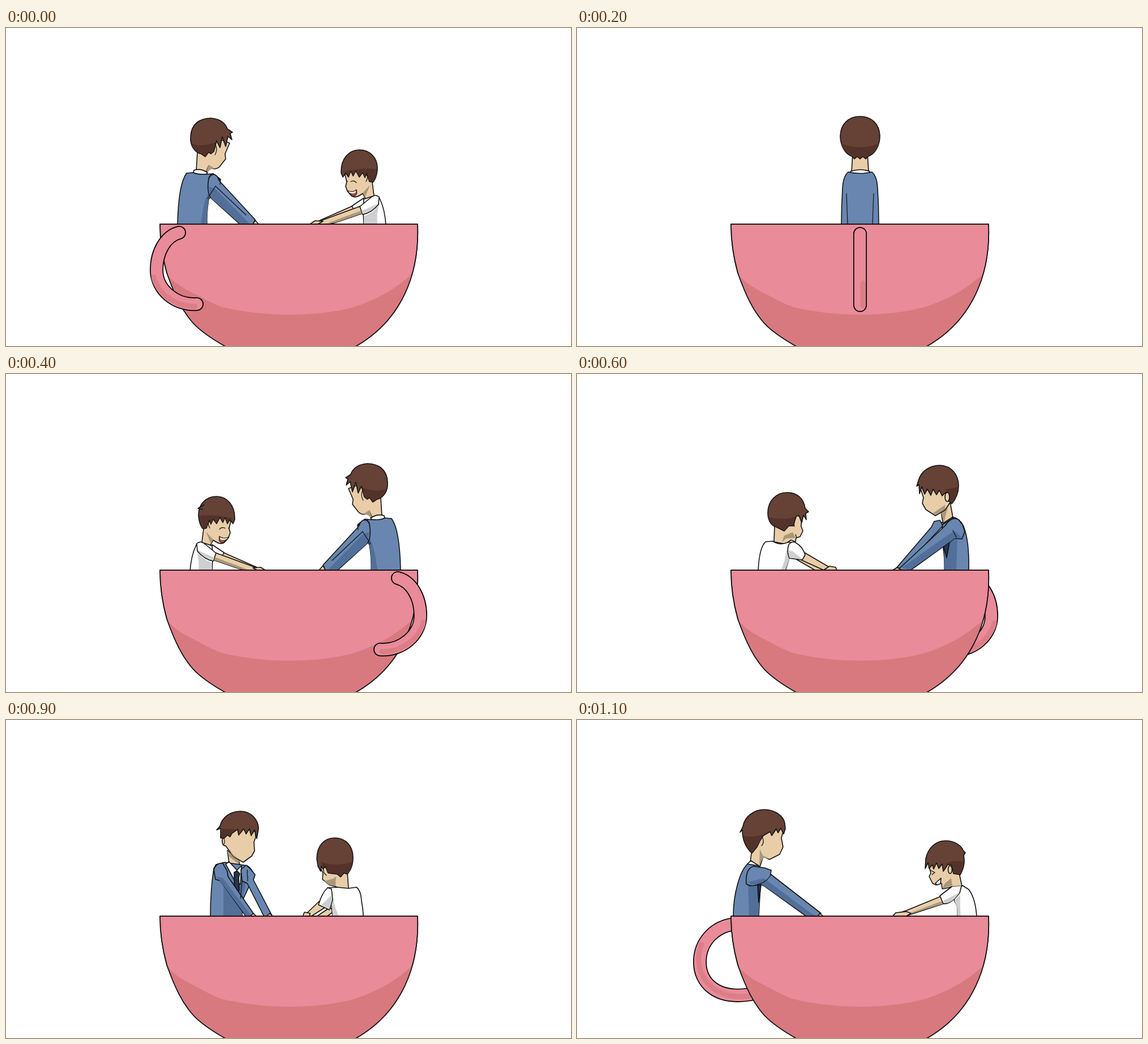
Recreate the animation shown at these times as an HTML page without scripts. Size 998x561 px, loop 1.2 s.

```html
<!DOCTYPE html>
<html lang="en">
<head>
<meta charset="utf-8">
<title>Teacup ride</title>
<style>
html, body { margin: 0; width: 100%; height: 100%; overflow: hidden; background: #fff; }
svg { display: block; width: 100%; height: 100%; stroke: #111; stroke-width: 1.6px; stroke-linejoin: round; stroke-linecap: round; }
.hair { fill: #654136; }
.skin { fill: #e8cda8; }
.blue { fill: #6886b0; }
.tie { fill: #263550; }
.white { fill: #fff; }
.line { fill: none; stroke-width: 1.2px; }
.mouth { fill: #a5493f; stroke-width: 1px; }
.shade { stroke: none; }
.shade.hair { fill: #53322a; }
.shade.skin { fill: #ab9779; }
.shade.blue { fill: #526f99; }
.shade.white { fill: #cfcfd1; }
.cup { fill: #e98b99; }
.dark { fill: #d8797f; stroke: none; }
.tube { fill: none; }
.edge { stroke: #000; stroke-width: 24px; }
.pink { stroke: #e98b99; stroke-width: 20.6px; }
.low { stroke: #dc7e88; stroke-width: 9px; }
.turn > g { visibility: hidden; animation: show 1.2s step-end infinite; animation-delay: calc((var(--i) - 12) * 100ms); }
@keyframes show {
  0% { visibility: visible; }
  8.3333%, 100% { visibility: hidden; }
}
</style>
</head>
<body>
<svg viewBox="0 0 998 561">
<defs>
  <path id="cup" d="M272 346H727C731 433 699 516 617 562H388C372 553 345 536 331 521C312 500 299 474 284 432C275 400 272 375 272 346Z"/>
  <clipPath id="inCup"><use href="#cup"/></clipPath>

  <!-- handle: three-quarter, near front, centre, side -->
  <path id="t1" d="M306 361C282 367 266 395 266 427C266 462 300 490 337 487"/>
  <path id="t2" d="M386 364C365 366 352 392 352 418C352 455 371 496 402 489"/>
  <path id="t3" d="M500 363V489"/>
  <path id="t4" d="M282 360C243 362 217 392 217 427C217 462 245 494 306 484"/>
  <g id="h1" class="tube">
    <use href="#t1" class="edge"/><use href="#t1" class="pink"/>
    <path class="low" d="M261 439C264 462 296 492 334 491"/>
  </g>
  <g id="h2" class="tube">
    <path class="low" d="M365 410C367 393 377 383 392 376M409 490L415 497"/>
    <use href="#t2" class="edge"/><use href="#t2" class="pink"/>
    <path class="low" d="M357 444C360 470 378 492 400 492"/>
  </g>
  <g id="h3" class="tube">
    <use href="#t3" class="edge"/><use href="#t3" class="pink"/>
    <path class="low" d="M505 450V490"/>
  </g>
  <g id="h4" class="tube">
    <use href="#t4" class="edge"/><use href="#t4" class="pink"/>
    <path class="low" d="M220 396C202 440 232 496 304 487"/>
  </g>

  <!-- man, from behind to front -->
  <g id="man1">
    <path class="skin" d="M338 220L336 252L353 255L358 243C364 250 371 250 377 245L388 231L387 222L395 203L370 193Z"/>
    <path class="shade skin" d="M354 253L358 241L369 248Q360 248 356 255Z"/>
    <path class="white" d="M332 251Q343 247 356 255L352 260H330Z"/>
    <path class="blue" d="M319 256C310 268 304 300 303 347H355C354 330 356 315 358 302L372 285L379 267L366 257Q340 260 331 255Z"/>
    <path class="shade blue" d="M344 346C348 320 350 302 359 289L358 302C356 320 355 330 355 346Z"/>
    <path class="blue" d="M358 266C362 255 372 256 376 268L379 272L440 338L436 347H414L362 300C356 292 356 278 358 266Z"/>
    <path class="shade blue" d="M358 280L369 283L431 346H414L362 300Z"/>
    <path class="line" d="M358 264L362 258M356 301L370 279L424 330M374 263L379 269L378 276"/>
    <path class="skin" d="M436 347L440 339L447 347Z"/>
    <path class="hair" d="M326 192C327 168 344 159 362 159C378 160 388 168 391 178L400 184L396 186L399 197L392 191L388 209L382 192L378 211L372 199L367 218L362 222L358 219L352 227L345 222C333 220 325 207 326 192Z"/>
    <path class="shade hair" d="M329 204C340 209 356 207 369 202L366 218L362 221L358 218L352 226L345 221C336 219 332 212 329 204Z"/>
    <path class="line" d="M369 204Q375 214 369 224"/>
  </g>
  <g id="man2">
    <path class="skin" d="M394 226L393 251L412 255L415 246L426 249Q435 242 439 228L442 203L420 205Z"/>
    <path class="shade skin" d="M411 254L415 239L427 248L417 247Z"/>
    <path class="white" d="M390 252Q402 247 412 257L396 260Z"/>
    <path class="blue" d="M421 305L441 347H418Z"/>
    <path class="blue" d="M373 253Q366 262 365 283Q362 315 361 347H420Q420 305 426 290L436 262L430 256L413 257L390 254Z"/>
    <path class="blue" d="M421 264Q429 252 436 262L442 272L438 287L475 347H458L430 296L422 296Q420 278 421 264Z"/>
    <path class="shade blue" d="M422 283L436 286L431 296H423Z"/>
    <path class="hair" d="M376 190C377 170 392 158 411 158C431 158 440 172 442 185L448 193L443 194L444 211L440 206L437 209L433 206L427 222L421 232L414 227L411 231L396 227C382 222 375 206 376 190Z"/>
    <path class="shade hair" d="M378 207C393 215 415 213 432 206L427 221L421 231L414 226L411 230L396 226C387 222 380 214 378 207Z"/>
    <path class="line" d="M433 207Q438 216 431 223M440 193L438 200"/>
  </g>
  <g id="manBack">
    <path class="skin" d="M487 220L485 254H515L513 220Z"/>
    <path class="white" d="M483 253Q500 247 517 253L515 259H485Z"/>
    <path class="blue" d="M479 254Q470 262 469 283Q467 315 467 347H533Q533 315 531 283Q530 262 521 254Q500 259 479 254Z"/>
    <path class="line" d="M476 292L478 346M524 292L522 346"/>
    <path class="hair" d="M465 190C466 169 480 156 500 156C520 156 534 169 535 190C535 207 527 222 515 226L510 231L505 227L500 231L495 227L490 231L485 226C473 222 465 207 465 190Z"/>
    <path class="shade hair" d="M467 204Q500 217 533 204C530 215 523 223 515 225L510 230L505 226L500 230L495 226L490 230L485 225C476 221 469 214 467 204Z"/>
  </g>
  <g id="man3">
    <path class="skin" d="M643 244L647 266L664 253L659 226Z"/>
    <path class="shade skin" d="M643 245L655 235L648 262Z"/>
    <path class="white" d="M640 260L647 263L664 252L666 257L648 268Z"/>
    <path class="blue" d="M645 266L666 253Q680 257 685 275Q693 300 692 347H649Q650 320 645 296Z"/>
    <path class="shade blue" d="M648 300L672 290L670 346H649Z"/>
    <path class="tie" d="M646 300L660 286L653 324Z"/>
    <path class="blue" d="M626 270L631 260L641 258L646 268L580 338L560 347Z"/>
    <path class="blue" d="M650 268Q662 250 674 257L681 266L685 278L680 291L667 290L588 347H564L575 338Z"/>
    <path class="shade blue" d="M574 342L655 284L667 277L681 289L667 290L588 346Z"/>
    <path class="line" d="M664 276L670 288"/>
    <path class="skin" d="M556 347L566 341L574 347Z"/>
    <path class="skin" d="M606 200L612 218L610 228L616 239L633 250L650 240L661 224L655 198Z"/>
    <path class="shade skin" d="M628 246L650 231L650 239L633 249Z"/>
    <path class="hair" d="M600 198L603 188C608 170 625 161 641 161C662 162 674 178 674 197C674 212 668 222 662 229L656 224L651 209L645 215L640 205L635 213L629 203L625 214L619 203L614 212L609 199L605 211L604 195Z"/>
    <path class="shade hair" d="M651 203Q664 202 673 199C673 212 668 221 662 228L656 223Z"/>
    <ellipse class="skin" cx="654" cy="217" rx="4" ry="8"/>
  </g>
  <g id="man4">
    <path class="skin" d="M391 230L394 252L408 268L414 262L411 246Z"/>
    <path class="shade skin" d="M391 231L412 247L411 254L393 240Z"/>
    <path class="blue" d="M371 255L386 251L426 257Q435 262 438 275L418 318L417 347H361Q361 300 367 262Z"/>
    <path class="shade blue" d="M384 346V290L425 280L418 318L417 346Z"/>
    <path class="white" d="M394 250L388 254L404 284L414 290L416 257L408 265Z"/>
    <path class="tie" d="M403 269L408 266L413 271L411 278L412 300L405 320L403 280Z"/>
    <path class="blue" d="M415 264L424 256L432 263L440 273L437 282L471 347H456L426 288L417 284Z"/>
    <path class="blue" d="M367 264Q372 251 383 253L391 267L392 276L441 347H424L379 284L370 281Z"/>
    <path class="shade blue" d="M370 276L383 279L434 346H424L379 285Z"/>
    <path class="line" d="M417 285L414 315M426 264L427 284"/>
    <path class="skin" d="M430 347L437 341L443 347ZM459 347L466 341L472 347Z"/>
    <path class="skin" d="M384 198L382 211Q381 222 388 222L402 241L419 251L434 240L439 231L438 215L441 207L440 185Z"/>
    <path class="shade skin" d="M388 222Q398 238 419 250L402 241Z"/>
    <path class="hair" d="M372 194L378 187C382 170 398 161 414 161C432 161 446 175 446 192L443 209L439 194L433 204L430 192L424 201L420 192L411 203L409 193L399 200L396 206L391 203L385 209L379 208V191Z"/>
    <path class="shade hair" d="M379 192L409 193L399 199L396 205L391 202L385 208L380 207Z"/>
    <path class="line" d="M384 208Q388 213 385 219"/>
  </g>
  <g id="man5">
    <path class="skin" d="M309 228L306 251L323 259L329 241L340 246L358 237L364 224L361 208L366 190L326 200Z"/>
    <path class="shade skin" d="M322 257L323 228L329 240L340 245L329 243Z"/>
    <path class="white" d="M301 254L307 248L321 257L312 262Z"/>
    <path class="blue" d="M301 254Q290 265 283 292Q276 318 276 347H321L324 292L341 275L320 257Z"/>
    <path class="shade blue" d="M304 346L302 285L324 290L321 346Z"/>
    <path class="tie" d="M319 291L325 292L321 322Z"/>
    <path class="blue" d="M299 289Q297 262 312 258L332 261L343 265L342 272L431 341L426 347H406L331 293L322 289Q308 296 299 289Z"/>
    <path class="shade blue" d="M302 286L330 279L412 340L424 346H406L331 293L322 288Q310 294 302 286Z"/>
    <path class="line" d="M323 289Q336 285 343 272"/>
    <path class="skin" d="M425 347L429 341L436 347Z"/>
    <path class="hair" d="M288 198L293 188C296 170 313 158 331 158C350 158 365 170 367 182L368 192L365 201L360 191L355 199L352 192L344 204L341 197L329 204L324 212L318 224L309 235C299 226 292 212 292 194Z"/>
    <path class="shade hair" d="M293 204Q312 209 329 201L324 212L318 223L309 234Q297 222 293 204Z"/>
    <path class="line" d="M327 206Q332 215 326 222"/>
  </g>
  <g id="manFront">
    <path class="blue" d="M466 262Q472 252 487 252H513Q528 252 534 262L540 300L532 347H468L460 300Z"/>
    <path class="white" d="M488 250L500 290L512 250Z"/>
    <path class="tie" d="M497 266H503L505 310L500 320L495 310Z"/>
    <path class="skin" d="M469 195L473 225L486 241L500 250L514 241L527 225L531 195Z"/>
    <path class="hair" d="M464 200C463 174 480 161 500 161C520 161 537 174 536 200L530 210L526 195L519 204L513 193L506 203L499 193L492 204L486 194L479 204L474 195L470 210Z"/>
    <path class="blue" d="M466 262L474 258L482 280L476 347H464L460 300ZM534 262L526 258L518 280L524 347H536L540 300Z"/>
  </g>

  <!-- kid, from front to behind -->
  <path id="tuft" class="hair" d="M350 231L339 237L347 239"/>
  <g id="kid1">
    <path class="skin" d="M612 314L553 340L560 344L622 318Z"/>
    <path class="white" d="M632 300L611 314L614 320L632 312Z"/>
    <path class="white" d="M632 302L647 296Q658 293 661 303Q669 320 671 347H632L631 325Z"/>
    <path class="shade white" d="M632 332Q648 328 660 308Q654 326 656 346H632Z"/>
    <path class="skin" d="M627 314L556 340L545 347H566L583 343L630 327Z"/>
    <path class="shade skin" d="M628 322L566 345L583 343L630 327Z"/>
    <path class="skin" d="M535 347L546 340L560 341L549 347Z"/>
    <path class="white" d="M647 297L625 315L630 329Q646 326 658 311L659 298"/>
    <path class="shade white" d="M628 323L657 310Q646 325 630 328Z"/>
    <path class="skin" d="M598 256L602 271L600 279L603 288L610 296Q616 302 630 292L635 301L650 296L646 265L635 240Z"/>
    <path class="shade skin" d="M630 291L643 277L634 299Z"/>
    <path class="mouth" d="M604 287Q612 291 619 285Q622 297 613 297Z"/>
    <path class="shade" fill="#fff" d="M605 288Q612 291 618 287L617 291Q611 293 606 290Z"/>
    <path class="line" d="M609 271Q615 268 619 273M601 269L603 271"/>
    <path class="hair" d="M595 263L592 256C591 230 606 215 624 215C643 215 656 229 656 247C656 258 652 268 648 272L642 271L637 256L634 264L630 255L624 263L618 252L613 261L609 252L605 263L600 256Z"/>
    <path class="shade hair" d="M595 254Q625 246 655 249C655 258 652 267 648 271L642 270L637 255L634 263L630 254L624 262L618 251L613 260L609 251L605 262L600 255Z"/>
    <path class="line" d="M636 259Q641 261 636 271"/>
  </g>
  <g id="kid2">
    <path class="skin" d="M546 319L516 343L527 347L554 330Z"/>
    <path class="white" d="M558 304L572 303Q580 314 592 304L606 299Q618 303 617 320Q620 332 620 347H568L569 327L560 322Z"/>
    <path class="shade white" d="M568 346Q580 332 593 336Q610 342 620 341V346Z"/>
    <path class="white" d="M560 303L543 320L551 331L566 325V310Z"/>
    <path class="shade white" d="M546 325L563 318L566 324L552 330Z"/>
    <path class="skin" d="M586 320L530 342L540 347H555L592 333Z"/>
    <path class="skin" d="M505 347L508 342H518L530 347ZM526 347L533 341L549 347Z"/>
    <path class="white" d="M590 307Q604 297 614 301L616 310Q604 322 592 335L584 320Z"/>
    <path class="shade white" d="M589 328Q604 320 615 308L615 312Q604 322 592 334Z"/>
    <path class="skin" d="M548 256L550 281Q556 293 565 297L572 296L574 306Q580 313 590 306L588 281L594 270L588 250Z"/>
    <path class="shade skin" d="M572 296L588 280L587 287Q579 291 573 301Z"/>
    <path class="mouth" d="M556 287Q563 291 570 287Q571 297 563 296Z"/>
    <path class="shade" fill="#fff" d="M557 288Q563 291 569 288L567 291H559Z"/>
    <path class="line" d="M551 275L557 273M566 274Q571 271 576 274M558 278L556 282"/>
    <path class="hair" d="M547 265L541 259C543 235 556 222 573 222C590 222 601 236 600 250C600 262 596 271 592 276L587 272L586 260L582 269L578 259L571 265L567 257L561 267L557 258L552 266L550 258Z"/>
    <path class="shade hair" d="M546 259Q572 247 599 252C599 262 596 270 592 275L587 271L586 259L582 268L578 258L571 264L567 256L561 266L557 257L552 265L550 257Z"/>
    <path class="line" d="M586 263Q591 265 587 274"/>
  </g>
  <g id="kid3">
    <path class="skin" d="M349 268L348 296L368 300L378 293L386 296L387 289L394 287L399 277L396 269L397 250H382Z"/>
    <path class="shade skin" d="M362 296L366 285L381 279L386 289L370 290Z"/>
    <path class="skin" d="M372 318L422 347H442L398 326Z"/>
    <path class="white" d="M333 296Q322 306 320 347H368L377 318L384 297L372 297Q358 303 346 295Z"/>
    <path class="shade white" d="M360 346Q368 330 370 310L378 318L368 346Z"/>
    <path class="skin" d="M400 314L446 341L438 347L396 328Z"/>
    <path class="skin" d="M434 347L446 339L457 341L459 347Z"/>
    <path class="white" d="M374 301Q380 294 387 298Q398 304 403 319L398 328L375 325Q370 313 374 301Z"/>
    <path class="shade white" d="M373 311L382 313L398 327L375 324Z"/>
    <path class="hair" d="M337 245C337 224 352 209 371 209C390 209 401 221 403 237L409 243L404 246L405 257L400 249L397 262L392 250L387 251L382 268L374 268L366 277L352 270C343 268 337 258 337 245Z"/>
    <path class="shade hair" d="M338 252Q366 260 391 250L387 251L382 267L374 267L366 276L352 269Q341 265 338 252Z"/>
    <path class="line" d="M387 253Q382 262 384 269M388 289L386 283"/>
  </g>
  <g id="kid4">
    <path class="skin" d="M554 258L560 270L559 281L571 291L583 294L585 299L605 298L603 268Z"/>
    <path class="shade skin" d="M562 284L571 291L582 293L583 276L578 280Z"/>
    <path class="skin" d="M553 320L529 343L538 347L563 331ZM572 331L548 347H566L580 337Z"/>
    <path class="white" d="M568 296L584 295L605 297L619 295Q627 301 628 320Q631 335 631 347H577L574 320Z"/>
    <path class="shade white" d="M575 325L578 314Q581 332 588 346H577Z"/>
    <path class="white" d="M568 296Q558 305 552 326L571 335L577 317L575 298Z"/>
    <path class="shade white" d="M557 326L575 309L576 318L571 334Z"/>
    <path class="skin" d="M524 347L527 339L537 341L536 347Z"/>
    <path class="hair" d="M549 245C549 223 561 208 580 208C600 208 613 222 613 243C613 256 608 266 603 272L597 270L591 277L585 272L569 270L564 258L560 263L557 258L556 267L551 258Z"/>
    <path class="shade hair" d="M556 250Q582 260 612 250C611 258 608 266 603 271L597 269L591 276L585 271L569 269L564 257L560 262Z"/>
    <path class="line" d="M562 259Q558 268 566 274"/>
  </g>
  <g id="kid5">
    <path class="white" d="M662 294L681 292L692 299Q704 315 706 347H672Q674 328 667 320Z"/>
    <path class="shade white" d="M667 318L677 308Q676 330 678 346H672Q673 330 667 320Z"/>
    <path class="skin" d="M643 311L582 336L560 343L580 346L648 324Z"/>
    <path class="shade skin" d="M646 319L590 340L580 345L648 324Z"/>
    <path class="skin" d="M557 347L563 340L582 338L590 341L580 347Z"/>
    <path class="skin" d="M621 254L625 270L622 276L628 288L634 291L644 288L645 298L656 296L662 294L680 293L674 265L660 245Z"/>
    <path class="shade skin" d="M645 297L650 288L661 279L663 292Z"/>
    <path class="white" d="M662 294L641 310L647 324Q660 326 676 305L679 293"/>
    <path class="shade white" d="M647 319L676 304Q662 325 648 323Z"/>
    <path class="white" d="M633 288L643 279L642 289L636 291Z"/>
    <path class="line" d="M624 265L632 269L627 273"/>
    <path class="hair" d="M615 262L616 245C620 225 634 213 651 213C668 213 680 223 682 230L686 234L683 239C686 252 682 264 677 273L665 271L662 256L655 255L647 267L645 254L639 262L635 252L630 263L628 255L622 262L620 252Z"/>
    <path class="shade hair" d="M650 254Q666 246 683 250C683 260 680 266 677 272L665 270L662 255Z"/>
    <ellipse class="skin" cx="659" cy="264" rx="3.5" ry="7"/>
  </g>
  <g id="kidBack">
    <path class="skin" d="M487 268L484 298H516L513 268Z"/>
    <path class="white" d="M482 295Q500 300 518 295Q530 300 532 325L533 347H467L468 325Q470 300 482 295Z"/>
    <path class="line" d="M476 322V346M524 322V346"/>
    <path class="hair" d="M468 243C468 222 481 207 500 207C519 207 532 222 532 243C532 257 525 268 515 271L508 276L500 271L492 276L485 271C475 268 468 257 468 243Z"/>
    <path class="shade hair" d="M469 250Q500 262 531 250C529 260 524 267 515 270L508 275L500 270L492 275L485 270C476 267 471 260 469 250Z"/>
  </g>
</defs>

<g class="turn">
  <g style="--i:0"><use href="#man1"/><use href="#kid1"/></g>
  <g style="--i:1"><use href="#kid2"/><use href="#man2"/></g>
  <g style="--i:2"><use href="#manBack"/></g>
  <g style="--i:3"><use href="#kid2" transform="translate(996) scale(-1 1)"/><use href="#tuft" x="57" y="3"/><use href="#man2" transform="translate(999 -1) scale(-1 1)"/></g>
  <g style="--i:4"><use href="#kid1" transform="translate(996 1) scale(-1 1)"/><use href="#tuft"/><use href="#man1" transform="translate(1000 -1) scale(-1 1)"/></g>
  <g style="--i:5" transform="translate(999) scale(-1 1)"><use href="#h4"/><use href="#man5"/><use href="#kid5"/></g>
  <g style="--i:6"><use href="#h1" transform="translate(998) scale(-1 1)"/><use href="#man3"/><use href="#kid3"/></g>
  <g style="--i:7" transform="translate(999) scale(-1 1)"><use href="#man4"/><use href="#kid4"/></g>
  <g style="--i:8"><use href="#manFront"/><use href="#kidBack"/></g>
  <g style="--i:9"><use href="#man4"/><use href="#kid4"/></g>
  <g style="--i:10" transform="translate(999) scale(-1 1)"><use href="#h1" transform="translate(998) scale(-1 1)"/><use href="#man3"/><use href="#kid3"/></g>
  <g style="--i:11"><use href="#h4"/><use href="#man5"/><use href="#kid5"/></g>
</g>

<use href="#cup" class="cup"/>
<path class="dark" clip-path="url(#inCup)" d="M280 424C288 446 312 458 335 470C360 483 373 490 385 493C455 509 540 511 612 493C660 478 690 458 716 435L740 562H270Z"/>
<use href="#cup" fill="none"/>

<g class="turn">
  <g style="--i:0"><use href="#h1"/></g>
  <g style="--i:1"><use href="#h2"/></g>
  <g style="--i:2"><use href="#h3"/></g>
  <g style="--i:3"><use href="#h2" transform="translate(999 -1) scale(-1 1)"/></g>
  <g style="--i:4"><use href="#h1" transform="translate(998 -1) scale(-1 1)"/></g>
</g>
</svg>
</body>
</html>
```
